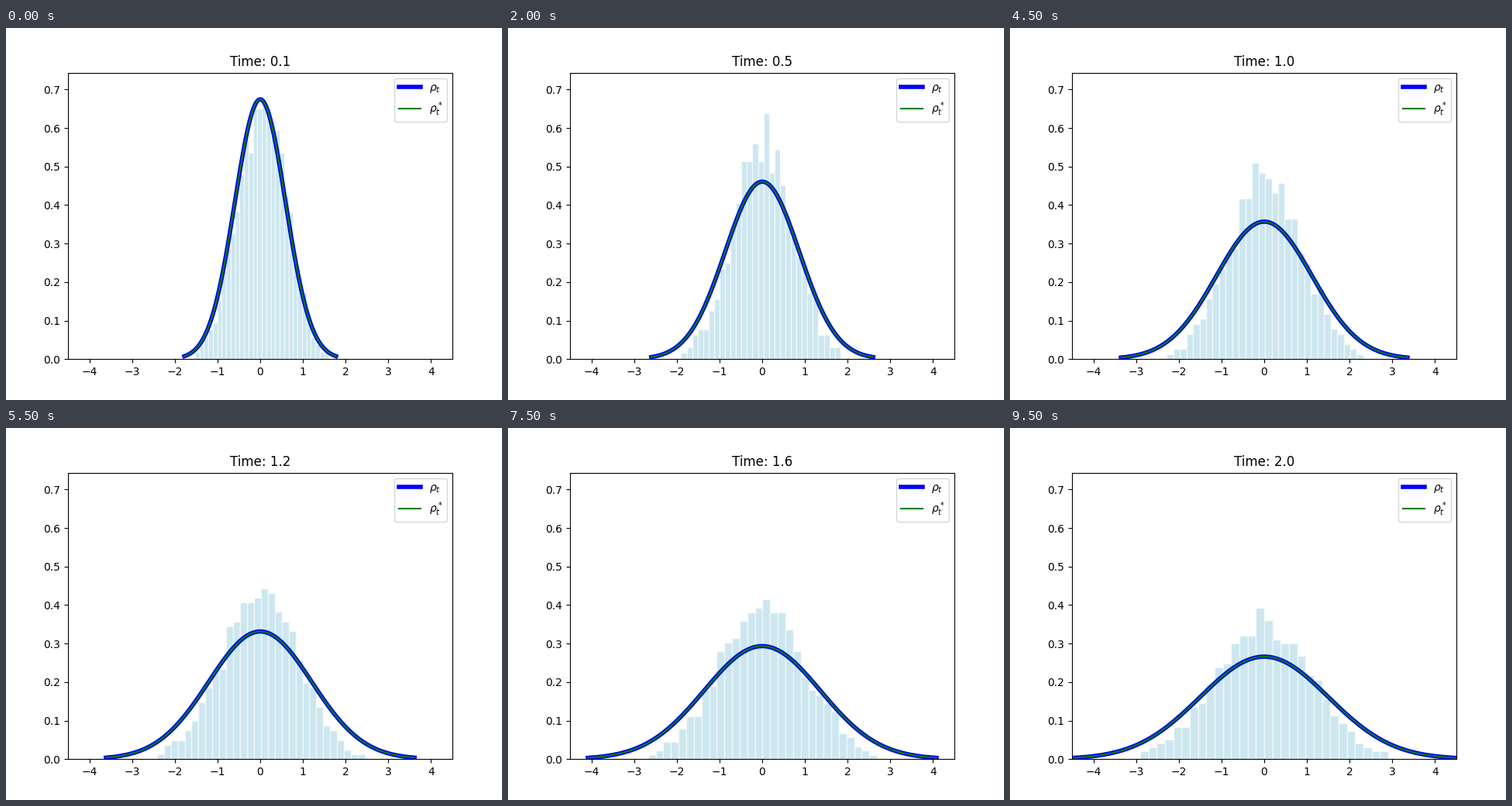
Write a matplotlib script that moves like this. It is 640 by 480 pixels and loops after 10000 ms.

```python
import numpy as np
import matplotlib.pyplot as plt
from matplotlib.animation import FuncAnimation

FRAMES, INTERVAL = 20, 500
SAMPLES, BINS = 500, 30
Y_TOP = 0.7438


def density(x, sigma):
    return np.exp(-0.5 * (x / sigma) ** 2) / (sigma * np.sqrt(2 * np.pi))


def spread(time):
    return np.sqrt(0.25 + time)


def histogram(time, seed):
    """Bars of a sample that diffuses a little slower than the curve."""
    reach = np.sqrt(2.14 + 3.15 * time)
    center = 0.02 * (2 - time)
    edges = center + np.linspace(-reach, reach, BINS + 1)
    width = edges[1] - edges[0]
    middles = (edges[:-1] + edges[1:]) / 2 - center
    expected = SAMPLES * width * density(middles, (0.36 + 0.018 * time) * reach)
    noise = np.random.default_rng(seed).normal(0, 0.35, BINS)
    counts = np.round(expected + noise * np.sqrt(expected))
    return edges[:-1], counts / (SAMPLES * width), width


fig, ax = plt.subplots(figsize=(6.4, 4.8), dpi=100)


def draw(step):
    ax.clear()
    time = 0.1 * (step + 1)
    left, heights, width = histogram(time, step)
    ax.bar(left, heights, width, align="edge", color="lightblue",
           edgecolor="white", alpha=0.6)
    sigma = spread(time)
    x = np.linspace(-3 * sigma, 3 * sigma, 200)
    y = density(x, sigma)
    ax.plot(x, y, color="blue", lw=4, label=r"$\rho_t$")
    ax.plot(x, y, color="green", lw=1.5, label=r"$\rho_t^*$")
    ax.set_xlim(-3 * spread(2), 3 * spread(2))
    ax.set_ylim(0, Y_TOP)
    ax.set_title(f"Time: {time:.1f}")
    ax.legend(loc="upper right")


anim = FuncAnimation(fig, draw, frames=FRAMES, interval=INTERVAL,
                     init_func=lambda: None, repeat=True, repeat_delay=0)
plt.show()
```
